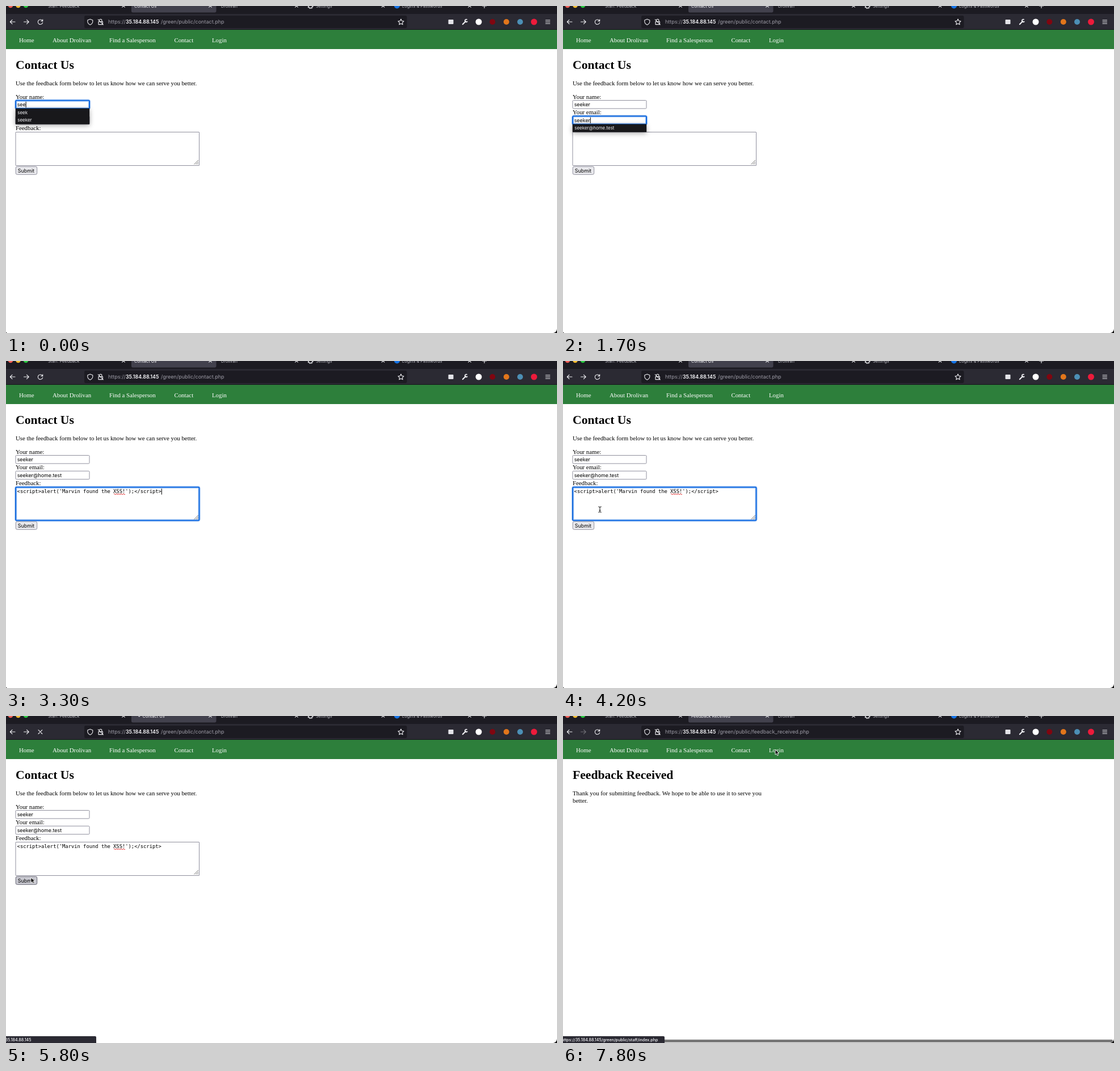
Recreate the animation shown at these times as an HTML page. Size 971 by 577 pixels, loop 8 s.

```html
<!DOCTYPE html>
<html lang="en">
<head>
<meta charset="utf-8">
<title>Contact form</title>
<style>
html, body { margin: 0; width: 100%; height: 100%; overflow: hidden; background: #fff; }
svg { display: block; width: 100%; height: 100%; }
text { white-space: pre; }
.page { font: 10.82px "Liberation Serif", "Times New Roman", serif; }
.title { font-size: 21.66px; font-weight: bold; }
.nav { fill: #fff; }
.ui { font-family: Inter, sans-serif; }
.tab { font-size: 7.45px; fill: #b9b9c0; }
.url { font-size: 9.05px; fill: #9d9ca6; }
.host { font-size: 8.8px; font-weight: 600; fill: #fbfbfe; }
.field { font: 8.9px Inter, sans-serif; }
.option { font: 7.95px Inter, sans-serif; fill: #f5f5f8; }
.code { font: 8.8px "DejaVu Sans Mono", monospace; }
.status { font: 500 7.1px Inter, sans-serif; fill: #fbfbfe; }
.icon { fill: none; stroke: #f0f0f4; stroke-width: 1.1; stroke-linecap: round; stroke-linejoin: round; }
.box { fill: #fff; stroke: #8f8f9d; stroke-width: 1; }
.halo { fill: none; stroke: #0060df; stroke-opacity: .3; stroke-width: 4.4; }
.ring { fill: none; stroke: #0060df; stroke-width: 1.8; }
.list { filter: drop-shadow(0 2px 4px rgba(0, 0, 0, .35)); }
</style>
</head>
<body>
<svg viewBox="0 0 971 577">
  <rect width="971" height="577" fill="#fff"/>

  <g class="ui">
    <rect width="971" height="15" fill="#1c1b22"/>
    <rect y="14" width="971" height="28" fill="#2b2a33"/>
    <rect x="138" y="17" width="568.5" height="22" rx="2.7" fill="#1c1b22"/>
    <rect y="41" width="971" height="1" fill="#15141a"/>
    <rect x="221" y="-12" width="149.5" height="23.5" rx="2.7" fill="#42414d"/>
    <circle cx="8" cy="-1" r="4.3" fill="#ff5f57"/>
    <circle cx="21.5" cy="-1" r="4.3" fill="#febc2e"/>
    <circle cx="35" cy="-1" r="4.3" fill="#28c840"/>
    <g class="tab">
      <text x="74" y="3">Staff: Feedback</text>
      <text id="tabTitle" x="226" y="3" fill="#fbfbfe">Contact Us</text>
      <text x="379" y="3">Drolivan</text>
      <text x="546" y="3">Settings</text>
      <text x="698" y="3">Logins &amp; Passwords</text>
    </g>
    <circle id="throbber" cy="0" r="1.6" fill="#d5d5dc"/>
    <g id="closers" class="icon" stroke-width=".9"></g>
    <path class="icon" d="M839.5 0h7M843-3.5v7"/>
    <circle class="icon" cx="536.5" cy="0" r="3.3"/>
    <circle class="icon" cx="536.5" cy="0" r="4.5" stroke-dasharray="1.7 1.85" stroke-linecap="butt"/>
    <circle cx="689" cy="-.5" r="5" fill="#1473e6"/>

    <path class="icon" d="M16 28H7.5M11 24.3 7.3 28 11 31.7"/>
    <path id="forward" class="icon" d="M31.5 28H40M36.5 24.3 40.2 28 36.5 31.7"/>
    <path id="reload" class="icon" d="M64 25.9A4.2 4.2 0 1 0 64.6 29.3M64.7 23.7V26.7H61.7"/>
    <path id="stop" class="icon" d="M57 24.7l6.8 6.8M63.8 24.7 57 31.5"/>
    <path class="icon" d="M148.3 23.3l4.5 1.6v2.4q0 4.1-4.5 5.9-4.5-1.8-4.5-5.9v-2.4z"/>
    <path class="icon" d="M164.5 27.3v-1.8a2.2 2.2 0 0 1 4.4 0v1.8M163 27.6h7.4v5H163zM162.3 23.8l9 9"/>
    <path class="icon" d="M696 23.1l1.5 3.2 3.5.5-2.5 2.5.6 3.5-3.1-1.7-3.1 1.7.6-3.5-2.5-2.5 3.5-.5z"/>
    <text class="url" x="180" y="31.4">https://</text>
    <text class="url host" x="211" y="31.4">35.184.88.145</text>
    <text id="path" class="url" x="273" y="31.4"></text>
    <rect x="779.5" y="24" width="9" height="8" rx="1" fill="#e4e4e9"/>
    <path d="M804.8 32.2l5.2-5.2" stroke="#f0f0f4" stroke-width="2" stroke-linecap="round"/>
    <path d="M812.6 24.2a2.3 2.3 0 1 0 .5 2.8" fill="none" stroke="#f0f0f4" stroke-width="1.8"/>
    <circle cx="833" cy="28" r="5.5" fill="#fff"/>
    <circle cx="857.3" cy="28" r="5" fill="#800610"/>
    <circle cx="881.8" cy="28" r="5" fill="#e2761b"/>
    <circle cx="906" cy="28" r="5" fill="#4c8fb5"/>
    <circle cx="930.5" cy="28" r="5.5" fill="#ed1b3b"/>
    <path class="icon" d="M951 25h7.5M951 28h7.5M951 31h7.5"/>
  </g>

  <g class="page">
    <rect y="42" width="971" height="34" fill="#2d7f3b"/>
    <g class="nav">
      <text x="23" y="64">Home</text>
      <text x="82" y="64">About Drolivan</text>
      <text x="182" y="64">Find a Salesperson</text>
      <text x="296.5" y="64">Contact</text>
      <text x="363" y="64">Login</text>
    </g>
    <text id="heading" class="title" x="17" y="110.5"></text>
    <text id="intro" x="17" y="140.3"></text>

    <text id="thanks" x="17" y="153.3">better.</text>

    <g id="form">
      <text x="17" y="163.8">Your name:</text>
      <text x="17" y="191.4">Your email:</text>
      <text x="17" y="218.8">Feedback:</text>
      <rect class="box" x="17" y="166.5" width="130" height="14.5" rx="1.5"/>
      <rect class="box" x="17" y="194.2" width="130" height="14.5" rx="1.5"/>
      <rect class="box" x="17" y="222.5" width="323.5" height="59" rx=".5"/>
      <g id="focus">
        <rect class="halo" rx="2"/>
        <rect class="ring" rx="1.5"/>
      </g>
      <path d="M331.5 279.5l7.5-7.5M334.5 279.5l4.5-4.5M337.3 279.5l1.7-1.7" stroke="#555" stroke-width=".8"/>
      <rect id="button" x="17.2" y="283.3" width="37.5" height="14" rx="2.5"/>
      <text class="field" x="20.8" y="293.6">Submit</text>
      <text id="name" class="field" x="19.7" y="177.2"></text>
      <text id="email" class="field" x="19.7" y="204.9"></text>
      <text id="feedback" class="code" x="19.6" y="233.2"></text>
      <path id="squiggle" d="M190 235q1-1.6 2 0t2 0 2 0 2 0 2 0 2 0 2 0 2 0 2 0 2 0" fill="none" stroke="#e02020" stroke-width=".9"/>
      <rect id="caret" width="1" height="10.5"/>
      <g id="nameList" class="list">
        <rect x="16.7" y="180.7" width="130.5" height="28" fill="#18181b"/>
        <text class="option" x="20.3" y="190.6">seek</text>
        <text class="option" x="20.3" y="204.2">seeker</text>
      </g>
      <g id="emailList" class="list">
        <rect x="16.7" y="208.5" width="130.5" height="14" fill="#18181b"/>
        <rect id="picked" x="16.7" y="208.5" width="130.5" height="14" fill="#43434f"/>
        <text class="option" x="20.3" y="218.4">seeker@home.test</text>
      </g>
    </g>
  </g>

  <rect id="scrollbar" y="571" width="969" height="5" rx="2" fill="#777"/>
  <path d="M971 570V577H964.5Q970 576 971 570zM0 575V577H2Q.4 576.6 0 575z" fill="#111"/>
  <g id="status">
    <path id="statusBox" fill="#2b2a33"/>
    <text id="statusText" class="status" y="574"></text>
  </g>

  <g id="pointer">
    <g id="beam" fill="none" stroke-linecap="round">
      <path d="M-2.3-5Q0-5 0-3.5Q0-5 2.3-5M0-3.5V3.5M-2.3 5Q0 5 0 3.5Q0 5 2.3 5M-1 1.5h2" stroke="#fff" stroke-width="2"/>
      <path d="M-2.3-5Q0-5 0-3.5Q0-5 2.3-5M0-3.5V3.5M-2.3 5Q0 5 0 3.5Q0 5 2.3 5M-1 1.5h2" stroke="#111" stroke-width="1"/>
    </g>
    <path id="arrow" d="M0 0V9.3L2.2 7.3 3.7 10.8 5.4 10.1 3.9 6.7H6.7z" stroke="#fff" stroke-width=".9"/>
  </g>
</svg>

<script>
const LOOP = 8000;
const $ = id => document.getElementById(id);
const show = (id, on) => { $(id).style.display = on ? '' : 'none'; };
const write = (id, value) => { if ($(id).textContent !== value) $(id).textContent = value; };
const within = (t, from, to) => t >= from && t < to;

const USER = 'seeker';
const EMAIL = 'seeker@home.test';
const SCRIPT = "<script>alert('Marvin found the XSS!');<\/script>";

const AT = { email: 800, pick: 2000, accept: 2300, pointer: 2500, area: 2900,
  paste: 3200, move: 4000, submit: 5500, login: 7100, received: 7600 };

// Pointer stops: time, x, y
const STOPS = [
  [2500, 92, 218], [2800, 71, 232], [4000, 71, 235], [4200, 65, 262],
  [4700, 48, 296], [5200, 44, 285], [6400, 44, 285], [7200, 374, 59], [LOOP, 374, 59]
];

const FIELDS = {
  name: { box: [17.2, 166.7, 129.8, 14.3], caretY: 168.7 },
  email: { box: [17.2, 194.4, 129.8, 14.3], caretY: 196.4 },
  feedback: { box: [17.2, 222.7, 323.3, 58.6], caretY: 225.2 }
};

$('closers').innerHTML = [207, 360, 512, 664.5, 817]
  .map(x => `<path d="M${x - 2.3}-2.5l4.6 4.6M${x + 2.3}-2.5l-4.6 4.6"/>`).join('');

function pointerAt(t) {
  const i = Math.max(1, STOPS.findIndex(stop => stop[0] > t));
  const [t0, x0, y0] = STOPS[i - 1], [t1, x1, y1] = STOPS[i];
  const p = Math.min(1, Math.max(0, (t - t0) / (t1 - t0)));
  const e = p * p * (3 - 2 * p);
  return [x0 + (x1 - x0) * e, y0 + (y1 - y0) * e];
}

function drawFields(t) {
  const nameLength = Math.min(6, 3 + Math.floor(t / 100));
  const emailLength = Math.min(6, Math.max(0, Math.floor((t - 900) / 100)));
  write('name', USER.slice(0, nameLength));
  write('email', t < AT.accept ? USER.slice(0, emailLength) : EMAIL);
  write('feedback', t < AT.paste ? '' : SCRIPT);
  show('squiggle', t >= AT.paste);
  show('nameList', nameLength < 6);
  show('emailList', emailLength > 0 && t < AT.accept);
  show('picked', within(t, AT.pick, AT.accept));

  const active = t < AT.email ? 'name' : t < AT.area ? 'email' : t < AT.submit ? 'feedback' : null;
  show('focus', active);
  const caretOn = active && !within(t, 1600, 1700) && !within(t, 2600, AT.area) &&
    !within(t, 3800, 4400) && !within(t, 4900, AT.submit);
  show('caret', caretOn);
  if (!active) return;
  const { box, caretY } = FIELDS[active];
  for (const rect of $('focus').children)
    ['x', 'y', 'width', 'height'].forEach((key, i) => rect.setAttribute(key, box[i]));
  $('caret').setAttribute('x', 19.6 + $(active).getComputedTextLength());
  $('caret').setAttribute('y', caretY);
}

function drawBrowser(t, loading, received) {
  write('tabTitle', received ? 'Feedback Received' : 'Contact Us');
  $('tabTitle').setAttribute('x', loading ? 240.5 : 226);
  write('path', '/green/public/' + (received ? 'feedback_received.php' : 'contact.php'));
  $('forward').style.opacity = received ? .35 : 1;
  show('reload', !loading);
  show('stop', loading);
  show('throbber', loading);
  $('throbber').setAttribute('cx', 231.5 + 4 * Math.cos((t - 5700) / 1000 * Math.PI * 2));

  const hoverLink = t >= AT.login;
  show('status', loading || received);
  $('statusBox').setAttribute('d', `M0 565H${hoverLink ? 177 : 157}q2 0 2 2V577H0z`);
  write('statusText', hoverLink ? 'https://35.184.88.145/green/public/staff/index.php' : '35.184.88.145');
  $('statusText').setAttribute('x', hoverLink ? -3 : -1.5);
  show('scrollbar', received);
}

function drawPointer(t) {
  const [x, y] = pointerAt(t);
  const overText = y < 283 && y > 160;
  const overButton = x < 55 && y >= 283 && y < 298;
  $('pointer').setAttribute('transform', `translate(${x} ${y})`);
  show('pointer', within(t, AT.pointer, AT.paste) || t >= AT.move);
  show('beam', overText && t < AT.submit);
  show('arrow', !overText || t >= AT.submit);
  $('button').setAttribute('fill', overButton && t > AT.move ? '#c9c9d1' : '#e9e9ed');
  $('button').setAttribute('stroke', overButton && t > AT.move ? '#676774' : '#8f8f9d');
}

function draw(now) {
  const t = Math.floor(now % LOOP / 100) * 100;
  const received = t >= AT.received;
  const loading = within(t, AT.submit, AT.received);
  write('heading', received ? 'Feedback Received' : 'Contact Us');
  write('intro', received
    ? 'Thank you for submitting feedback. We hope to be able to use it to serve you'
    : 'Use the feedback form below to let us know how we can serve you better.');
  show('thanks', received);
  show('form', !received);
  drawFields(t);
  drawBrowser(t, loading, received);
  drawPointer(t);
}

const start = performance.now();
function tick() {
  draw(performance.now() - start);
  requestAnimationFrame(tick);
}
tick();
</script>
</body>
</html>
```
